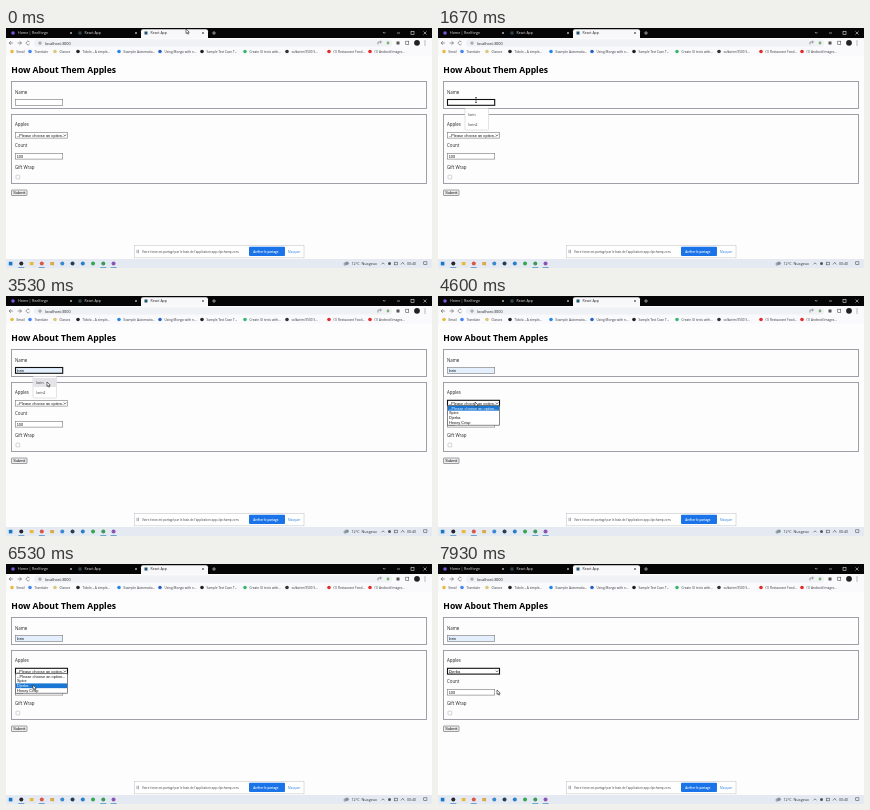
Animation of 426 by 240 pixels, one loop 8 s. Source, as an HTML page with a canvas:

```html
<!DOCTYPE html>
<html lang="en">
<head>
<meta charset="utf-8">
<title>Form demo</title>
<style>
html, body { margin: 0; width: 100%; height: 100%; overflow: hidden; background: #fdfdfe; }
canvas { display: block; width: 100vw; height: 100vh; }
</style>
</head>
<body>
<canvas id="stage"></canvas>
<script>
const W = 426, H = 240, LOOP = 8000, STEP = 1000 / 15;
const UI = '"Open Sans", "Noto Sans", sans-serif';
const FORM = '"Liberation Sans", Arial, sans-serif';
const canvas = document.getElementById('stage');
const c = canvas.getContext('2d');

// Pointer stops: time, x, y
const path = [
  [0, 180, 1], [130, 180, 1], [800, 43, 64], [1050, 43, 64], [1450, 38, 72],
  [2650, 38, 72], [3200, 41, 86], [3850, 41, 86], [4350, 37, 106],
  [4900, 37, 106], [5900, 27, 121], [7050, 27, 121], [7650, 59, 126], [8000, 59, 126]
];
const FOCUS = 1600, HOVER = 3050, PICK = 3800, OPEN = 4470, CHOOSE = 7080;
const options = ['--Please choose an option--', 'Spice', 'Djerba', 'Honey Crisp'];
const bookmarks = [
  [6, '#e5bd3c', 'Email'], [24, '#4285f4', 'Translate'], [49, '#d9c878', 'Classes'],
  [72, '#242424', 'Tidolo – A simple…'], [113, '#2386e8', 'Example Automatio…'],
  [154, '#2762c8', 'Using Mongo with n…'], [196, '#222222', 'Sample Test Case T…'],
  [239, '#38b86c', 'Create UI tests with…'], [281, '#303030', 'solkarim/3500 S…'],
  [323, '#e32929', '(1) Restaurant Food…'], [364, '#e32929', '(1) Android Images…']
];
const taskIcons = ['#22272e', '#e8b93d', '#dc5548', '#d8ab45', '#3d89cf', '#263f58',
  '#287fc8', '#35a857', '#3c9b5c', '#8b55b4'];

function rect(x, y, w, h, fill, line, width = 0.6) {
  if (fill) { c.fillStyle = fill; c.fillRect(x, y, w, h); }
  if (line) { c.strokeStyle = line; c.lineWidth = width; c.strokeRect(x, y, w, h); }
}

function round(x, y, w, h, r, fill, line) {
  c.beginPath();
  c.roundRect(x, y, w, h, r);
  if (fill) { c.fillStyle = fill; c.fill(); }
  if (line) { c.strokeStyle = line; c.lineWidth = 0.6; c.stroke(); }
}

function dot(x, y, r, fill) {
  c.beginPath();
  c.arc(x, y, r, 0, 7);
  c.fillStyle = fill;
  c.fill();
}

function text(s, x, y, size, fill = '#202124', font = UI, weight = 400) {
  c.font = `${weight} ${size}px ${font}`;
  c.fillStyle = fill;
  c.fillText(s, x, y);
}

function stroke(color, width, ...lines) {
  c.beginPath();
  for (const pts of lines) pts.forEach(([x, y], i) => i ? c.lineTo(x, y) : c.moveTo(x, y));
  c.strokeStyle = color;
  c.lineWidth = width;
  c.stroke();
}

function cross(x, y, r, color) {
  stroke(color, 0.6, [[x - r, y - r], [x + r, y + r]], [[x + r, y - r], [x - r, y + r]]);
}

function arrow(x, y, dir) {
  stroke('#55585c', 0.6, [[x - 2 * dir, y], [x + 2 * dir, y]],
    [[x, y - 1.8], [x + 2 * dir, y], [x, y + 1.8]]);
}

function drawTabs() {
  rect(0, 0, W, 10, '#050505');
  round(135, 1.2, 67, 11, 2, '#f8f8fa');
  dot(7, 5, 1.8, '#7658d8');
  text('Home | Reelforge', 12, 6.3, 3.6, '#e6e6e6');
  rect(72.5, 3.5, 3, 3, '#334a54');
  text('React App', 78.5, 6.3, 3.5, '#e6e6e6');
  rect(138.5, 3.5, 3, 3, '#24566a');
  text('React App', 144.5, 6.3, 3.5);
  cross(65, 5, 1, '#d8d8d8');
  cross(130, 5, 1, '#d8d8d8');
  cross(197, 5, 1, '#444');
  stroke('#ddd', 0.6, [[206, 5], [210, 5]], [[208, 3], [208, 7]]);
  stroke('#ddd', 0.6, [[377, 4], [378.2, 5.4], [379.4, 4]], [[391, 5], [394, 5]]);
  rect(405, 3.5, 3, 3, null, '#ddd');
  cross(419, 5, 1.5, '#ddd');
}

function drawToolbar() {
  rect(0, 10, W, 18, '#fafafc');
  arrow(5, 15, -1);
  arrow(13.5, 15, 1);
  c.beginPath();
  c.arc(22, 15, 1.8, 0.5, 5.7);
  c.strokeStyle = '#55585c';
  c.lineWidth = 0.6;
  c.stroke();
  round(28, 11.5, 358, 7, 3.5, '#f0f1f4');
  dot(34, 15, 1.5, '#777b80');
  dot(34, 15, 0.8, '#f0f1f4');
  text('localhost:3000', 39, 16.5, 3.8);
  stroke('#666', 0.6, [[372, 16.5], [372, 14], [375, 14]], [[374, 12.8], [375.5, 14], [374, 15.2]]);
  dot(382, 15, 1.4, '#7bad70');
  rect(390.5, 13.5, 3, 3, '#555');
  rect(399.7, 13.2, 3, 3.4, null, '#555');
  dot(411, 14.8, 2.9, '#222');
  for (const y of [13, 15, 17]) dot(419, y, 0.5, '#555');
  for (const [x, color, label] of bookmarks) {
    dot(x, 23.5, 1.8, color);
    text(label, x + 4.4, 24.8, 3.2, '#34373b');
  }
}

function field(x, y, w, value, fill, focused) {
  rect(x, y, w, 5.8, fill, focused ? '#101010' : '#777', focused ? 1.1 : 0.6);
  text(value, x + 1.2, y + 4.3, 3.9, '#111', FORM);
}

function drawForm(t) {
  text('How About Them Apples', 5.3, 45.3, 8.6, '#000', UI, 700);
  for (const [y, h] of [[53.5, 27], [86.5, 69]]) {
    rect(5.5, y, 415, h, null, '#96969f', 0.9);
  }
  text('Name', 9, 65.7, 4.4);
  text('Apples', 9, 98.2, 4.4);
  text('Count', 9, 119.2, 4.4);
  text('Gift Wrap', 9, 141, 4.4);

  const filled = t >= HOVER;
  field(9.5, 71.5, 47.2, filled ? 'lorin' : '', filled ? '#e3effd' : '#fff', t >= FOCUS && t < OPEN);
  field(9.5, 104.3, 52, t < CHOOSE ? options[0] : options[2], '#fff', t >= OPEN);
  stroke('#222', 0.7, [[57.8, 106.6], [59, 107.8], [60.2, 106.6]]);
  field(9.5, 125.3, 47.2, '100', '#fff', false);
  round(10, 147.2, 3.7, 3.7, 0.5, '#fff', '#b5b5ba');
  round(5.5, 162, 15.5, 5.5, 0.5, '#ededf0', '#666');
  text('Submit', 7.3, 166.2, 3.9, '#111', FORM);
}

function drawSuggestions(t) {
  if (t < FOCUS || t >= PICK) return;
  round(27, 80.5, 23.5, 21.5, 0.8, '#fff', '#d2d2d7');
  if (t >= HOVER) rect(27.3, 82, 22.9, 9, '#e4e4e9');
  text('lorin', 30.3, 87.8, 3.4);
  text('lorin2', 30.3, 97.7, 3.4);
}

function drawOptions(t, y) {
  if (t < OPEN || t >= CHOOSE) return;
  const top = 109.7, row = 4.75;
  const active = Math.max(0, Math.min(3, Math.floor((y - top) / row)));
  rect(9.5, top, 52, row * 4 + 0.5, '#fff', '#555', 0.7);
  options.forEach((label, i) => {
    const rowY = top + i * row;
    if (i === active) rect(9.8, rowY + 0.2, 51.4, row, '#1976d2');
    text(label, 11, rowY + 3.8, 3.9, i === active ? '#fff' : '#111', FORM);
  });
}

function drawShareBar() {
  rect(128.5, 217.5, 169.5, 12.3, '#fff', '#c8c8ce');
  stroke('#68758a', 0.6, [[131, 221.8], [131, 225.2]], [[132.5, 221.8], [132.5, 225.2]]);
  text("Votre écran est partagé par le biais de l'application app.clipchamp.com.", 136, 224.7, 2.95, '#3b3e43');
  round(243, 218.8, 36, 9.3, 1, '#1a73e8');
  text('Arrêter le partage', 247.2, 224.7, 2.95, '#fff', UI, 600);
  text('Masquer', 282, 224.7, 3, '#287bd8');
}

function drawTaskbar() {
  rect(0, 231, W, 9, '#e5eaf2');
  rect(2.8, 233.8, 3.6, 3.6, '#1878c8');
  taskIcons.forEach((color, i) => {
    const x = 15.3 + i * 10.25;
    if (i === 1 || i === 3) rect(x - 1.8, 234, 3.8, 3.2, color);
    else dot(x, 235.5, 2, color);
  });
  for (const x of [15.3, 35.8, 97.3, 107.6]) rect(x - 3, 239, 6, 0.8, '#4e91c9');
  dot(339.2, 236, 1.7, '#9ca9b7');
  dot(341, 235.2, 1.8, '#818f9f');
  text('12°C  Nuageux', 345.5, 237, 3.7, '#30343a');
  stroke('#444', 0.6, [[375.5, 236.3], [377, 234.8], [378.5, 236.3]]);
  dot(383.5, 235.6, 1.5, '#4c5663');
  rect(388.6, 234.2, 3, 2.6, null, '#555');
  stroke('#444', 0.6, [[395, 236.5], [396.7, 234.3], [398.4, 236.5]]);
  text('00:40', 401, 237, 3.5, '#30343a');
  rect(417.7, 233.8, 3.2, 2.8, null, '#555');
}

function pointerAt(t) {
  const i = path.findIndex(p => p[0] > t);
  const [t0, x0, y0] = path[i - 1], [t1, x1, y1] = path[i];
  const u = (t - t0) / (t1 - t0), e = u * u * (3 - 2 * u);
  return [x0 + (x1 - x0) * e, y0 + (y1 - y0) * e];
}

function drawPointer(x, y, t) {
  if (t > 1400 && t < 2700) {
    stroke('#222', 0.6, [[x - 1, y - 2.5], [x + 1, y - 2.5]],
      [[x, y - 2.5], [x, y + 2.5]], [[x - 1, y + 2.5], [x + 1, y + 2.5]]);
    return;
  }
  c.beginPath();
  [[0, 0], [0, 4.5], [1.1, 3.6], [1.9, 5.2], [2.6, 4.9], [1.9, 3.3], [3.3, 3.2]]
    .forEach(([a, b], i) => i ? c.lineTo(x + a, y + b) : c.moveTo(x + a, y + b));
  c.closePath();
  c.fillStyle = '#fff';
  c.fill();
  c.strokeStyle = '#222';
  c.lineWidth = 0.6;
  c.stroke();
}

function resize() {
  const dpr = devicePixelRatio || 1;
  const w = Math.round(innerWidth * dpr), h = Math.round(innerHeight * dpr);
  if (canvas.width !== w || canvas.height !== h) {
    canvas.width = w;
    canvas.height = h;
  }
  c.setTransform(w / W, 0, 0, h / H, 0, 0);
}

const start = performance.now();

function draw(now) {
  const elapsed = Math.max(0, now - start) % LOOP;
  const t = Math.floor(elapsed / STEP) * STEP;
  const [x, y] = pointerAt(t);
  resize();
  rect(0, 0, W, H, '#fdfdfe');
  drawTabs();
  drawToolbar();
  drawForm(t);
  drawSuggestions(t);
  drawOptions(t, y);
  drawShareBar();
  drawTaskbar();
  drawPointer(x, y, t);
  requestAnimationFrame(draw);
}
draw(start);
</script>
</body>
</html>
```
